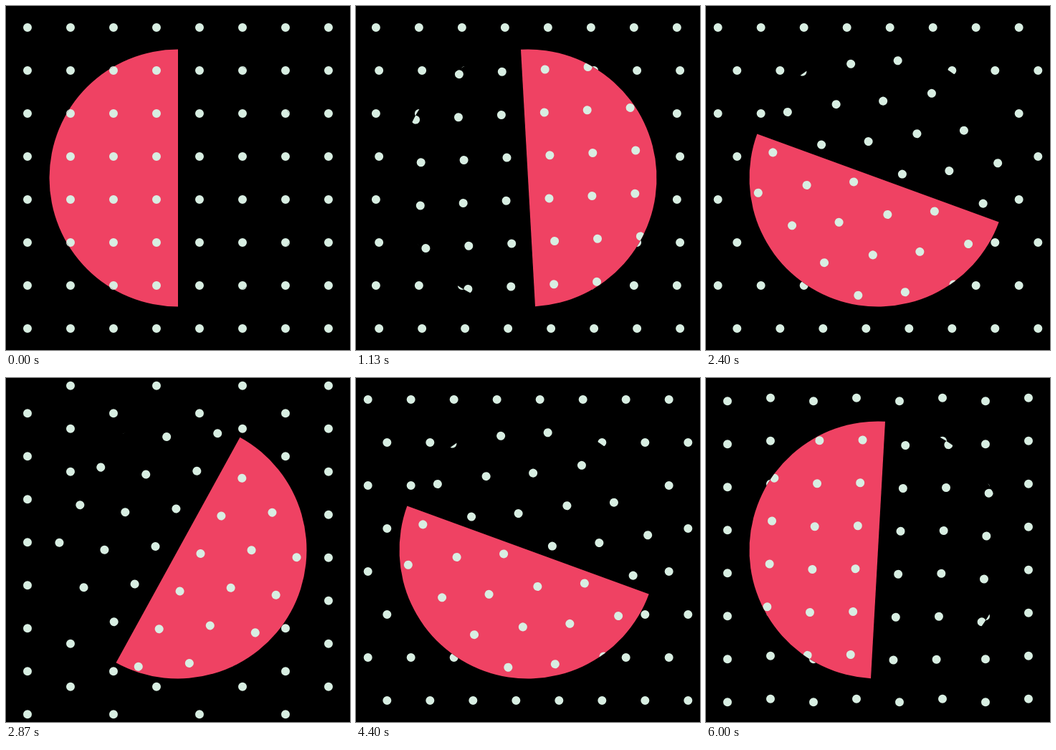
Write an HTML page with a canvas that moves like this. It is 480x480 px and loops after 6.07 s.

```html
<!DOCTYPE html>
<html lang="en">
<head>
<meta charset="utf-8">
<title>Turning disc and sliding dots</title>
<style>
  html, body { margin: 0; width: 100%; height: 100%; overflow: hidden; background: #000; }
  canvas { display: block; width: 100vw; height: 100vh; }
</style>
</head>
<body>
<canvas id="stage" width="480" height="480"></canvas>
<script>
const ctx = document.getElementById('stage').getContext('2d');
const SIZE = 480, CENTER = SIZE / 2, GAP = 60, DOT = 6, DISC = 179.5;
const LOOP = 6070, FPS = 15, TURN = 0.5; // ms, steps per second, seconds per quarter turn
const RED = '#ef4263', PALE = '#d8eee2';

const easeInOut = t => t < 0.5 ? 2 * t * t : 1 - 2 * (1 - t) * (1 - t);

function poseAt(ms) {
  const step = Math.floor((ms + 3.4) * FPS / 1000);
  const turns = Math.max(0, step - 1) / FPS / TURN;
  const whole = Math.floor(turns + 1e-9);
  const p = easeInOut(Math.max(0, turns - whole));
  return {
    vertical: whole % 2 === 1,
    shift: GAP * Math.min(p, 1 - p),
    angle: -(whole + p) * Math.PI / 2
  };
}

// Neighbouring rows (or columns) slide in opposite directions.
function drawDots({ vertical, shift }) {
  ctx.fillStyle = PALE;
  ctx.beginPath();
  for (let row = -1; row <= 8; row++) {
    for (let col = -1; col <= 8; col++) {
      let x = GAP * (col + 0.5), y = GAP * (row + 0.5);
      if (vertical) y += col % 2 ? -shift : shift;
      else x += row % 2 ? shift : -shift;
      ctx.moveTo(x + DOT, y);
      ctx.arc(x, y, DOT, 0, Math.PI * 2);
    }
  }
  ctx.fill();
}

function fillArc(color, from, to) {
  ctx.fillStyle = color;
  ctx.beginPath();
  ctx.arc(CENTER, CENTER, DISC, from, to);
  ctx.fill();
}

function draw(ms) {
  const pose = poseAt(ms);
  ctx.fillStyle = '#000';
  ctx.fillRect(0, 0, SIZE, SIZE);
  drawDots(pose);

  ctx.save();
  ctx.translate(CENTER, CENTER);
  ctx.rotate(pose.angle);
  ctx.translate(-CENTER, -CENTER);
  fillArc('#000', 0, Math.PI * 2);
  fillArc(RED, Math.PI / 2, Math.PI * 1.5);
  ctx.beginPath();
  ctx.arc(CENTER, CENTER, DISC, 0, Math.PI * 2);
  ctx.clip();
  drawDots(pose);
  ctx.restore();
}

const start = performance.now();
function tick() {
  draw((performance.now() - start) % LOOP);
  requestAnimationFrame(tick);
}
tick();
</script>
</body>
</html>
```
